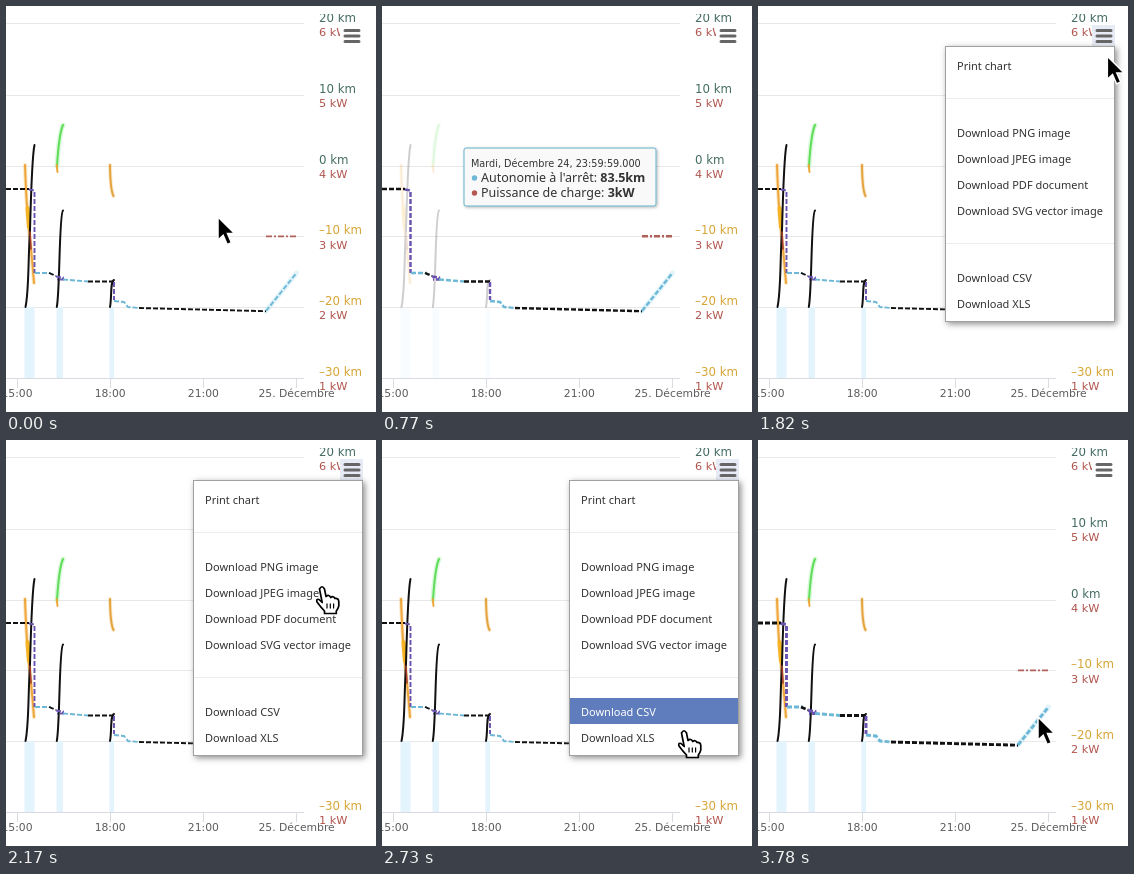
Write an HTML page that moves like this. It is 370x406 px and loops after 3990 ms.

```html
<!DOCTYPE html>
<html lang="fr">
<head>
<meta charset="utf-8">
<title>Chart export</title>
<style>
  html, body { margin: 0; width: 100%; height: 100%; overflow: hidden; background: #fff; }
  svg { display: block; width: 370px; height: 406px; }
  path { fill: none; }
  .axis { font: 10.8px "DejaVu Sans", sans-serif; fill: #5c5c5c; text-anchor: middle; }
  .km { font: 11.8px "DejaVu Sans", sans-serif; fill: #456d64; }
  .km.low { fill: #d6a637; }
  .kw { font: 11.3px "DejaVu Sans", sans-serif; fill: #b0554d; }
  .head { font: 9.7px "DejaVu Sans", sans-serif; fill: #333; }
  .row { font: 12.5px "Noto Sans", sans-serif; fill: #333; }
  .row tspan { font-weight: 700; }
  .item { font: 11px "Noto Sans", sans-serif; fill: #333; }
  .soft { stroke-linecap: round; stroke-linejoin: round; }
</style>
</head>
<body>
<svg viewBox="0 0 370 406">
  <defs>
    <filter id="shadow" x="-20%" y="-20%" width="140%" height="140%">
      <feDropShadow dx="2" dy="2" stdDeviation="3" flood-color="#666" flood-opacity=".75"/>
    </filter>
    <filter id="tipShadow" x="-20%" y="-20%" width="140%" height="150%">
      <feDropShadow dx="1" dy="1" stdDeviation="1.5" flood-color="#000" flood-opacity=".3"/>
    </filter>
  </defs>
  <g id="grid"></g>
  <g id="trips"></g>
  <g id="range"></g>
  <path id="charge" d="M260 230.3H291" stroke="#b0625a" stroke-dasharray="6 2 2 2"/>
  <g id="labels"></g>
  <path d="M300 0H370V8H300Z" style="fill:#fff"/>
  <rect id="button" x="334" y="19" width="23" height="22"/>
  <path class="soft" d="M339 24.5H353M339 30H353M339 35.5H353" stroke="#666" stroke-width="3"/>
  <g id="tip">
    <rect x="82" y="142" width="192" height="58" rx="2" fill="#fafafa" fill-opacity=".96" stroke="#62b3c8" filter="url(#tipShadow)"/>
    <text class="head" x="89" y="161">Mardi, Décembre 24, 23:59:59.000</text>
    <circle cx="92.5" cy="172" r="2.7" fill="#6cb8d6"/>
    <text class="row" x="99" y="176">Autonomie à l'arrêt: <tspan>83.5km</tspan></text>
    <circle cx="92.5" cy="187" r="2.7" fill="#b4594f"/>
    <text class="row" x="99" y="191">Puissance de charge: <tspan>3kW</tspan></text>
  </g>
  <g id="menu">
    <rect x="187.5" y="40.5" width="169" height="275" fill="#fff" stroke="#a0a0a0" filter="url(#shadow)"/>
    <path d="M188 92.5H356M188 237.5H356" stroke="#ececec"/>
  </g>
  <path id="arrow" d="M0 0V23L5.2 18.2L9.2 27.5L13.4 25.7L9.5 16.6H16.8Z" style="fill:#000" stroke="#fff" stroke-width="1.5"/>
  <g id="hand">
    <path class="soft" d="M-2.5 2Q0-2.5 2.5 2L4 9.5Q7 7 8.7 10.5Q11.5 8.5 13 11.5Q16.5 11 16.8 14.5V19Q16 22 14.3 24V26.5H2.5V24Q-1 20.5-5 15Q-6 11.5-3 12.5L.2 15.5Z" style="fill:#fff" stroke="#000" stroke-width="1.7"/>
    <path d="M5 16.5V21.5M8.3 16.5V21.5M11.6 16.5V21.5" stroke="#000" stroke-width="1.2"/>
  </g>
</svg>
<script>
const $ = id => document.getElementById(id);

function add(parent, tag, attrs, text = '') {
  const el = document.createElementNS('http://www.w3.org/2000/svg', tag);
  for (const k in attrs) el.setAttribute(k, attrs[k]);
  el.textContent = text;
  parent.append(el);
  return el;
}

// Axes and labels
for (const y of [17.5, 89.5, 160.5, 230.5, 301.5]) add($('grid'), 'path', { d: `M0 ${y}H298`, stroke: '#e8e8e8' });
add($('grid'), 'path', { d: 'M0 372.5H298M11.5 372V382M104.5 372V382M197.5 372V382M290.5 372V382', stroke: '#d8dbe2' });
['15:00', '18:00', '21:00', '25. Décembre'].forEach((s, i) =>
  add($('labels'), 'text', { class: 'axis', x: 11 + 93.2 * i, y: 391 }, s));
for (let i = 0; i < 6; i++) {
  const km = 20 - 10 * i, y = 16 + 70.8 * i;
  add($('labels'), 'text', { class: km < 0 ? 'km low' : 'km', x: 313, y }, (km < 0 ? '–' : '') + Math.abs(km) + ' km');
  add($('labels'), 'text', { class: 'kw', x: 313, y: y + 14.2 }, 6 - i + ' kW');
}

// Trips: shaded periods and solid curves
for (const [x, w] of [[18.5, 10], [50.5, 6.5], [103.5, 4.5]])
  add($('trips'), 'rect', { x, y: 301, width: w, height: 71, fill: '#e3f4fd' });
const curve = (d, stroke, width = 2, opacity = 1) =>
  add($('trips'), 'path', { class: 'soft', d, stroke, 'stroke-width': width, 'stroke-opacity': opacity });
const drop = 'M19 159Q20.5 202 23 224T28 277', climb = 'M51 160Q53 128 57 119';
curve(drop, '#f3ad3c', 4, .3);
curve(drop, '#eda63a');
curve('M21.5 202L23 221', '#f5b324', 4);
curve(climb, '#6be86b', 5, .25);
curve(climb, '#5fdc58');
curve('M50.7 159L51.5 166', '#eda63a');
curve('M104 159Q104.3 184 107.5 190', '#f3ad3c', 4, .25);
curve('M104 159Q104.3 184 107.5 190', '#e3a43f');
curve('M19.5 301C23 285 22 255 24 224Q26 150 28.5 139', '#111');
curve('M24 226L25 243', '#a2402f', 1.6);
curve('M50.8 301C54 285 53 208 57 204.5', '#111');
curve('M104 301C106 290 104 276 108 274', '#111');

// Range at rest, coloured by activity
const blue = '#6cb8d6', violet = '#6a52ae';
add($('range'), 'path', { class: 'soft', d: 'M260 305L290.5 267', stroke: '#bfe6f3', 'stroke-width': 5, 'stroke-opacity': .45 });
const dashed = [
  ['M0 183H23', '#111'],
  ['M23 183.5L28.5 184.5V267', violet],
  ['M29 267H45', blue],
  ['M43 267L50 270', '#111'],
  ['M50 270.5L57 271.5V273.5H51', violet],
  ['M57 273.5L82 275.5', blue],
  ['M82 275.5H108', '#111'],
  ['M108 276V294', violet],
  ['M108 295L118 296L122 301L133 302', blue],
  ['M133 302L260 305.2', '#111'],
  ['M260 305L290.5 267', blue]
].map(([d, stroke]) => add($('range'), 'path', { d, stroke, 'stroke-dasharray': '5 2' }));

// Menu entries with the steps during which each is hovered
const items = [
  ['Print chart', 60], ['Download PNG image', 127], ['Download JPEG image', 153, [31, 33]],
  ['Download PDF document', 179, [33, 34]], ['Download SVG vector image', 205, [34, 36]],
  ['Download CSV', 272, [36, 39.5], [40.3, 60]], ['Download XLS', 298, [39, 40.3]]
].map(([name, y, ...spans]) => ({
  spans,
  back: add($('menu'), 'rect', { x: 188, y: y - 14, width: 168, height: 26, fill: '#5f7cbd' }),
  text: add($('menu'), 'text', { class: 'item', x: 199, y: y + 4 }, name)
}));

const STEP = 70, LOOP = 3990;
const clamp = v => Math.max(0, Math.min(1, v));
const pointer = [
  [0, 212, 211], [1, 232, 196], [2, 264, 172], [3, 302, 138], [5, 368, 58], [6, 388, 40], [11, 388, 26],
  [14, 360, 28], [16, 353, 30], [24, 354, 31], [27, 347, 60], [31, 316, 147], [33, 312, 168],
  [37, 306, 262], [39, 302, 291], [41, 295, 292], [43, 285, 285], [46, 284, 283], [50, 284, 283],
  [51, 281, 278], [54, 280, 277], [57, 280, 277]
];

function pointerAt(f) {
  const i = pointer.findIndex(k => k[0] > f);
  const [a, ax, ay] = pointer[i - 1], [b, bx, by] = pointer[i];
  const p = (f - a) / (b - a);
  return `translate(${ax + (bx - ax) * p} ${ay + (by - ay) * p})`;
}

const show = (id, on) => $(id).setAttribute('visibility', on ? 'visible' : 'hidden');

function draw(f) {
  const tip = Math.min(clamp((f - 2) / 2), clamp((14 - f) / 3));
  const dim = Math.min(clamp((f - 3) / 3), clamp((14 - f) / 3));
  const inMenu = f >= 17 && f < 51;
  $('tip').setAttribute('opacity', tip);
  $('trips').setAttribute('opacity', 1 - .8 * dim);
  $('charge').setAttribute('stroke-width', tip > 0 ? 2.6 : 1.7);
  const width = tip > 0 ? 2.4 : f >= 52 ? 2.9 : 1.9;
  for (const el of dashed) el.setAttribute('stroke-width', width);
  $('button').setAttribute('fill', f >= 16 && f < 51 ? '#e6ebf5' : '#fff');
  show('menu', inMenu);
  for (const { spans, back, text } of items) {
    const glow = Math.max(0, ...spans.map(([a, b]) => Math.min(clamp((f - a) / 3), clamp((b + 3 - f) / 3))));
    back.setAttribute('opacity', glow);
    text.style.fill = glow > .45 ? '#fff' : '#333';
  }
  const hand = f >= 27 && inMenu;
  show('hand', hand);
  show('arrow', !hand);
  $(hand ? 'hand' : 'arrow').setAttribute('transform', pointerAt(f));
}

const start = performance.now();
function tick() {
  draw(Math.floor((performance.now() - start) % LOOP / STEP));
  requestAnimationFrame(tick);
}
tick();
</script>
</body>
</html>
```
